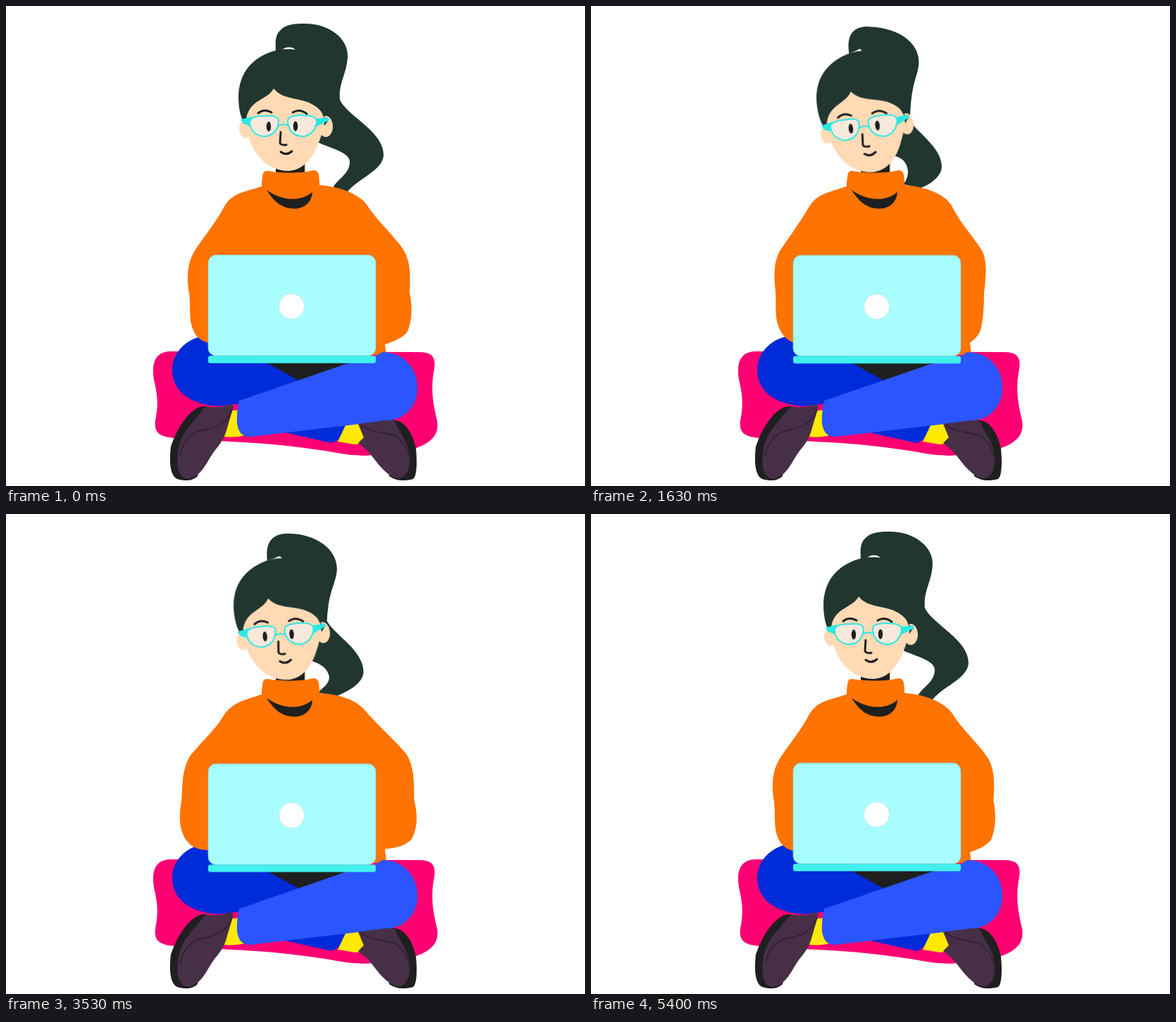
An HTML page without scripts that plays this animation: 822x681 px, repeating every 5460 ms.

```html
<!DOCTYPE html>
<html lang="en">
<head>
<meta charset="utf-8">
<title>Working cross-legged</title>
<style>
html, body { margin: 0; width: 100%; height: 100%; overflow: hidden; background: #fff; }
svg { display: block; width: 100vw; height: 100vh; }

.hair { fill: #20362f; }
.skin { fill: #ffdab5; }
.ink { fill: #1f1f1f; }
.line { fill: none; stroke: #1f1f1f; stroke-width: 3; stroke-linecap: round; stroke-linejoin: round; }
.orange { fill: #ff7300; }
.navy { fill: #002bd8; }
.blue { fill: #2b55ff; }
.sock { fill: #ffe900; }
.shoe { fill: #472f48; }
.seam { fill: none; stroke: #2a1c2b; stroke-width: 1.2; }
.lens { fill: #f9e9dc; stroke: #2be8e4; stroke-width: 2; }
.temple { fill: #2be8e4; }

.head, .pupils, .tail, .left, .right { animation: 2730ms infinite; }
.head { animation-name: tilt; transform-origin: 408px 236px; }
.pupils { animation-name: glance; }
.tail { animation-name: sway; }
.left { animation-name: left; animation-timing-function: ease-in-out; }
.right { animation-name: right; }
.laptop { animation: bob 682.5ms cubic-bezier(.37, 0, .63, 1) infinite alternate; }

@keyframes tilt {
  0%, 100% { transform: translate(0, 0) rotate(0deg); animation-timing-function: cubic-bezier(.37, 0, .63, 1); }
  50% { transform: translate(1.3px, .8px) rotate(-6.6deg); animation-timing-function: cubic-bezier(.37, 0, .63, 1); }
}
@keyframes glance {
  0%, 100% { transform: translate(0, 0); }
  26% { transform: translate(-1.8px, -.5px); }
  58% { transform: translate(1.6px, -1.6px); }
}
@keyframes bob { to { transform: translateY(1.3px); } }

/* bun and ponytail: sine swing through a middle pose */
@keyframes sway {
  0%, 100% {
    d: path("M383 64C382 48 383 40 390 34C397 26 409 25 425 25C458 25 486 46 485 71C484 97 472 108 474 133C484 156 536 178 536 211C536 234 496 246 484 265L464 258C470 246 489 238 488 220C487 208 462 202 444 194L420 110L412 63C407 57 397 57 391 63Z");
    animation-timing-function: cubic-bezier(.47, 0, .745, .715);
  }
  25% {
    d: path("M373 66C372 52 373 42 380 35C387 28 396 27 407 27C442 28 472 49 472 77C471 99 459 108 457 147C470 170 512 190 512 222C512 238 492 250 466 260L443 253C450 246 464 241 463 229C460 217 448 211 436 207L415 110L395 62C393 59 388 59 385 62Z");
    animation-timing-function: cubic-bezier(.39, .575, .565, 1);
  }
  50% {
    d: path("M365 68C362 50 366 40 372 35C379 30 387 29 394 30C438 32 465 54 464 81C463 102 453 106 452 166C464 184 494 202 495 229C495 240 484 252 468 258L444 253C446 249 448 242 447 234C446 224 442 217 430 214L410 110L381 62C380 61 379 61 378 62Z");
    animation-timing-function: cubic-bezier(.47, 0, .745, .715);
  }
  75% {
    d: path("M373 66C372 52 373 42 380 35C387 28 396 27 407 27C442 28 472 49 472 77C471 99 459 108 457 147C470 170 512 190 512 222C512 238 492 250 466 260L443 253C450 246 464 241 463 229C460 217 448 211 436 207L415 110L395 62C393 59 388 59 385 62Z");
    animation-timing-function: cubic-bezier(.39, .575, .565, 1);
  }
}
@keyframes left {
  0%, 100% { d: path("M410 250L363 256C335 265 322 265 310 284C300 305 275 335 267 349C257 365 257 385 259 402C263 420 259 440 264 455C268 468 275 475 288 478L410 478Z"); }
  25.6% { d: path("M410 250L363 256C335 265 320 268 307 289C295 309 270 330 260 345C250 362 250 385 249 405C246 425 244 440 252 457C260 472 270 476 288 477L410 478Z"); }
  57.5% { d: path("M410 250L363 256C335 265 320 267 309 286C298 305 277 335 268 348C259 365 260 385 262 402C264 420 261 440 266 453C270 466 278 474 288 478L410 478Z"); }
  75.6% { d: path("M410 250L363 256C335 265 320 268 307 289C296 308 271 331 261 346C252 362 252 385 251 405C248 425 247 440 254 457C261 472 271 476 288 477L410 478Z"); }
}
@keyframes right {
  0%, 100% {
    d: path("M400 250L445 254C475 256 503 268 513 283C525 303 555 330 565 347C575 365 574 385 573 407C577 425 577 445 570 462C562 472 552 475 538 480L540 495L400 495Z");
    animation-timing-function: ease-out;
  }
  25.6% {
    d: path("M400 250L445 254C475 256 498 264 510 279C525 297 557 325 570 342C580 360 580 380 580 405C585 425 586 445 576 462C566 472 552 474 538 475L540 495L400 495Z");
    animation-timing-function: ease-in-out;
  }
  57%, 65% {
    d: path("M400 250L445 254C475 256 502 267 512 283C522 305 545 330 555 347C563 362 561 385 558 407C558 425 557 445 553 460C550 468 545 472 538 478L540 495L400 495Z");
    animation-timing-function: ease-in;
  }
}
</style>
</head>
<body>
<svg viewBox="0 0 822 681" preserveAspectRatio="none">
  <!-- cushion -->
  <path fill="#ff0073" d="M236 490C212 489 206 506 210 530C216 555 216 568 212 588C210 606 218 611 240 613L318 618C370 620 425 626 470 634C500 639 515 639 532 635L580 628C600 621 616 611 612 588C605 560 603 540 608 515C611 495 602 491 585 491Z"/>

  <!-- hair and head -->
  <path class="tail hair" d="M383 64C382 48 383 40 390 34C397 26 409 25 425 25C458 25 486 46 485 71C484 97 472 108 474 133C484 156 536 178 536 211C536 234 496 246 484 265L464 258C470 246 489 238 488 220C487 208 462 202 444 194L420 110L412 63C407 57 397 57 391 63Z"/>
  <path class="skin" d="M383 215H426V240H383Z"/>
  <path class="ink" d="M383 230L424 224V240H383Z"/>
  <g class="head">
    <path class="hair" d="M341 168C330 160 328 126 332 112C338 86 357 70 383 63C395 60 420 60 440 70C457 86 464 110 464 135L457 170Z"/>
    <ellipse class="skin" cx="340" cy="174" rx="9" ry="13"/>
    <ellipse class="skin" cx="454" cy="171" rx="10" ry="15"/>
    <path class="skin" d="M380 117C371 134 346 132 341 160C341 178 345 192 353 205C363 222 380 234 401 234C424 233 437 212 443 196C448 184 451 175 451 162C451 148 440 142 430 137C412 130 392 132 380 117Z"/>
    <path class="hair" d="M342 158L338 163L342 169ZM451 156L457 163L452 170Z"/>
    <path class="line" d="M358 152Q367 145 377 151M407 151Q417 145 427 153"/>
    <path class="temple" d="M349 157L333 161L337 167L347 171ZM439 160L457 158L459 162L441 171Z"/>
    <path class="lens" d="M346 166C345 158 355 156 366 156C380 155 387 157 387 163C386 177 378 185 366 185C354 184 347 176 346 166ZM400 163C400 157 408 155 420 155C434 155 442 158 441 165C439 177 431 185 420 185C408 184 400 176 400 163Z"/>
    <path fill="none" stroke="#2be8e4" stroke-width="2" d="M386 170Q394 166 401 170"/>
    <g class="pupils ink">
      <ellipse cx="373" cy="171" rx="3.2" ry="7"/>
      <ellipse cx="411" cy="170.500" rx="3.2" ry="7"/>
    </g>
    <path class="line" d="M390 179L389 194Q390 198 398 197M390 207Q398 213 406 206"/>
  </g>

  <!-- back leg and sweater -->
  <path class="navy" d="M295 467C262 466 236 488 236 516C236 546 260 565 302 568L335 564L420 531L370 500Z"/>
  <path class="navy" d="M395 605L462 620Q478 615 482 594Z"/>
  <path class="left orange" d="M410 250L363 256C335 265 322 265 310 284C300 305 275 335 267 349C257 365 257 385 259 402C263 420 259 440 264 455C268 468 275 475 288 478L410 478Z"/>
  <path class="right orange" d="M400 250L445 254C475 256 503 268 513 283C525 303 555 330 565 347C575 365 574 385 573 407C577 425 577 445 570 462C562 472 552 475 538 480L540 495L400 495Z"/>
  <path class="orange" d="M371 234C363 234 365 240 363 250V262H445V250C444 240 445 234 437 233C418 238 388 237 371 234Z"/>
  <path class="ink" d="M370 261C391 276 417 279 435 264C434 280 422 288 408 287.500C391 287 380 277 370 261Z"/>
  <path class="ink" d="M366 504H500L440 545L415 531Z"/>

  <!-- feet and front leg -->
  <path class="sock" d="M321 574L309 611Q325 613 340 609L331 573Z"/>
  <path class="sock" d="M482 595L500 591L508 612Q506 622 495 622L471 618Z"/>
  <path class="blue" d="M482 508L331 560Q327 578 328 592Q331 613 348 611L545 588C570 584 585 564 584 540C583 510 561 491 534 491L520 500Z"/>
  <path class="ink" d="M286 568C262 564 241 603 234 625C231 650 234 667 243 671C256 675 266 673 272 667Z"/>
  <path class="shoe" d="M283 568C268 590 247 603 244 635C242 655 245 668 257 671C278 669 284 647 297 630C304 622 310 613 313 602L323 568L318 565C309 570 295 570 283 568Z"/>
  <path class="seam" d="M321 573C312 598 288 600 271 604C256 612 250 624 247 638"/>
  <path class="ink" d="M545 588C565 584 577 606 582 628C584 650 583 667 578 671C564 675 552 673 544 667Z"/>
  <path class="shoe" d="M500 593L538 588Q550 587 553 590C556 603 570 614 573 638C575 660 566 671 555 670C536 665 525 643 511 629L500 620L508 612Z"/>
  <path class="seam" d="M504 594C516 606 540 604 553 610C565 618 570 628 572 640"/>

  <g class="laptop">
    <rect x="287" y="353.200" width="238" height="143" rx="11" fill="#a8feff" stroke="#8fc9c4" stroke-width=".8"/>
    <rect x="287" y="496.200" width="238" height="10.500" rx="3" fill="#42f0ee"/>
    <circle cx="405.500" cy="426.200" r="18" fill="#fff" stroke="#b9dedd" stroke-width=".6"/>
  </g>
</svg>
</body>
</html>
```
